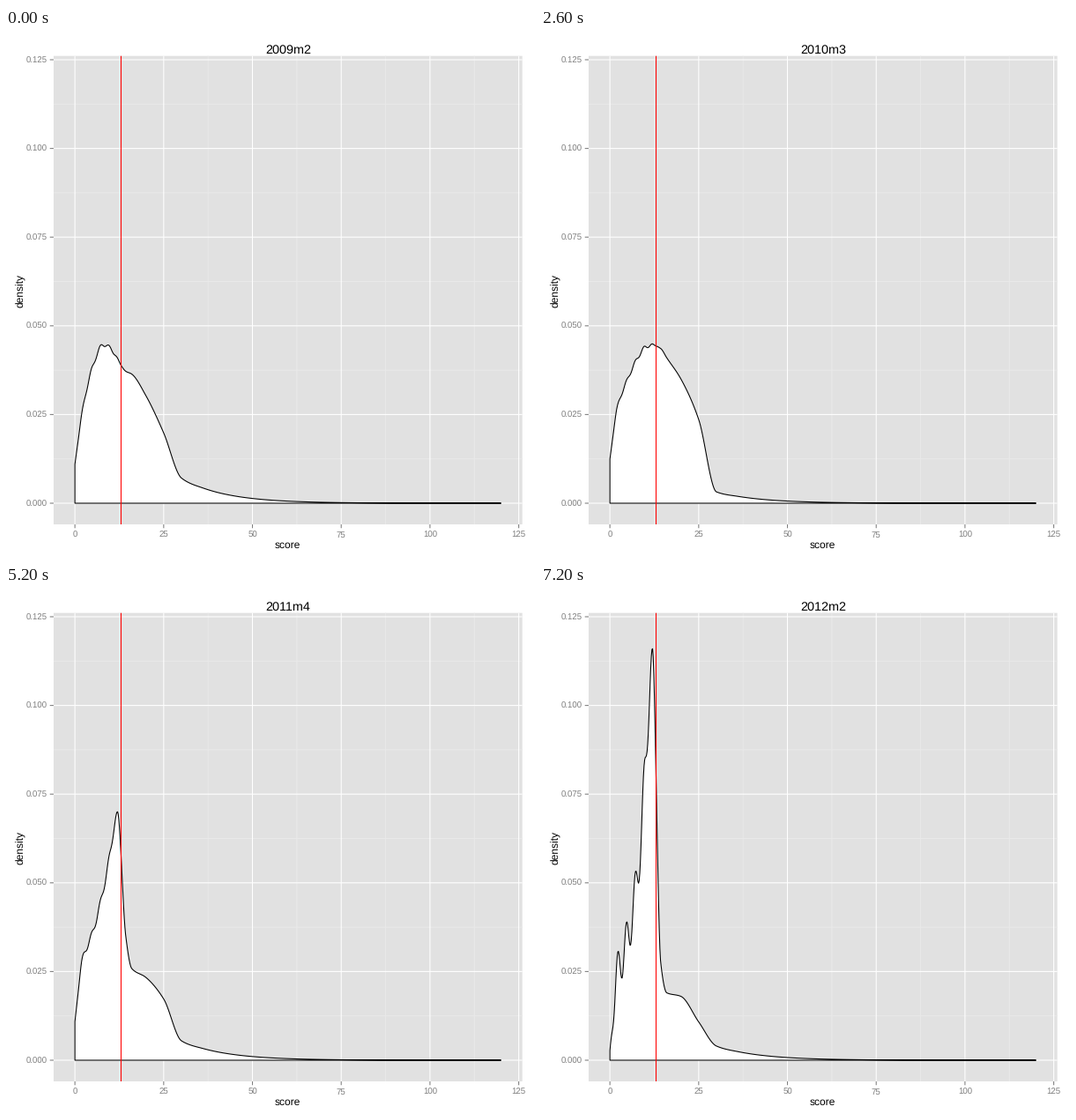
Write a matplotlib script that moves like this. It is 600 px wide and 600 px high and loops after 7400 ms.

```python
import numpy as np
import matplotlib.pyplot as plt
from matplotlib.animation import FuncAnimation
from matplotlib.patches import Polygon, Rectangle

SIZE, DPI = 600, 100
PT = 72 / DPI  # points per pixel
MONTHS, STEP_MS = 37, 200
LEFT, RIGHT, TOP, BOTTOM = 54, 585.6, 31.7, 563
STROKE = 1.07
GREY = "#7F7F7F"

plt.rcParams.update({
    "font.family": "Liberation Sans",
    "text.hinting": "none",
    "path.snap": False,
})


def px(score):
    return 78.16 + 4.0273 * score


def py(density):
    return 539 - 4024 * density


# Density in thousandths at a few scores, keyed by months since 2009m2.
SCORES = [0, 2, 5, 8, 10, 12, 14.3, 16, 20, 25, 30]
HEIGHTS = {
    0: [10.9, 25.4, 38.5, 44.7, 43.7, 40.6, 37.2, 36.4, 30.3, 19.8, 7.1],
    5: [9.7, 25.6, 38.3, 47.1, 49.3, 46, 43, 42, 33.5, 19.6, 2.9],
    13: [12.4, 26.6, 35, 41.3, 44, 44.6, 43.6, 41, 35, 23.6, 3.2],
    17: [15.1, 26.3, 33.5, 39.2, 42.4, 43, 42, 40.8, 35.3, 27.8, 1.7],
    22: [14.2, 32.8, 40.5, 46, 49, 51.2, 36, 31, 26.7, 20, 4.1],
    29: [8.2, 24.1, 32.7, 49.5, 66.2, 83.2, 34.5, 22, 20.8, 15.2, 6.5],
    36: [2, 23.8, 34.3, 54, 83, 112.4, 27.6, 19, 18, 10.8, 4],
}
TAIL = np.arange(36, 121, 6)
GRID = np.linspace(0, 120, 700)


def smooth(x, y, at):
    """Monotone cubic interpolation."""
    x, y = np.asarray(x, float), np.asarray(y, float)
    h = np.diff(x)
    d = np.diff(y) / h
    a, b = d[:-1], d[1:]
    same = a * b > 0
    m = np.concatenate([d[:1], np.zeros(len(a)), d[-1:]])
    m[1:-1][same] = 2 * a[same] * b[same] / (a[same] + b[same])
    i = np.clip(np.searchsorted(x, at, side="right") - 1, 0, len(h) - 1)
    t = (at - x[i]) / h[i]
    return (y[i] * (1 + 2 * t) * (1 - t) ** 2 + m[i] * h[i] * t * (1 - t) ** 2
            + y[i + 1] * t**2 * (3 - 2 * t) - m[i + 1] * h[i] * t**2 * (1 - t))


def ripple(month):
    """Wave below the cutoff that sharpens in the last months."""
    size = 0.5 + 5.5 * (month / 36) ** 8
    window = np.exp(-((GRID - 6.5) / 6) ** 8)
    return size * window * np.cos(2 * np.pi * (GRID - 2.2) / 2.45)


def outline(month):
    """Closed density outline in pixels."""
    body = [np.interp(month, list(HEIGHTS), column)
            for column in zip(*HEIGHTS.values())]
    tail = body[-1] * np.exp((SCORES[-1] - TAIL) / 12)
    density = smooth(np.append(SCORES, TAIL), np.append(body, tail), GRID)
    density = (density + ripple(month)) / 1000
    return np.vstack([(px(0), py(0)),
                      np.column_stack([px(GRID), py(density)]),
                      (px(120), py(0))])


fig = plt.figure(figsize=(SIZE / DPI, SIZE / DPI), dpi=DPI, facecolor="white")
ax = fig.add_axes([0, 0, 1, 1])
ax.set(xlim=(0, SIZE), ylim=(SIZE, 0))
ax.axis("off")


def line(xs, ys, color, z=2):
    ax.plot(xs, ys, color=color, lw=STROKE * PT, zorder=z,
            solid_capstyle="butt")


def label(x, y, text, size, color="black", ha="center", **kw):
    return ax.text(x, y, text, fontsize=size * PT, color=color, ha=ha,
                   va="baseline", **kw)


ax.add_patch(Rectangle((LEFT, TOP), RIGHT - LEFT, BOTTOM - TOP,
                       fc="#E1E1E1", ec="none", zorder=0))

for i in range(5):
    x, y = px(12.5 + 25 * i), py(0.0125 + 0.025 * i)
    line([x, x], [TOP, BOTTOM], "#E9E9E9", 1)
    line([LEFT, RIGHT], [y, y], "#E9E9E9", 1)
for i in range(6):
    x, y = px(25 * i), py(0.025 * i)
    line([x, x], [TOP, BOTTOM], "white")
    line([LEFT, RIGHT], [y, y], "white")
    line([x, x], [BOTTOM, BOTTOM + 4.25], GREY)
    line([LEFT - 4.25, LEFT], [y, y], GREY)
    label(x, 578.3, str(25 * i), 9.6, GREY)
    label(47, y + 3.5, f"{0.025 * i:.3f}", 9.6, GREY, "right")

label(319.8, 590, "score", 12)
label(19.8, 297.5, "density", 12, rotation=90, rotation_mode="anchor")
title = label(319.8, 29, "", 14.4)

shape = Polygon(outline(0), closed=True, fc="white", ec="black",
                lw=STROKE * PT, joinstyle="round", zorder=3)
ax.add_patch(shape)
line([px(13)] * 2, [TOP, BOTTOM], "red", 4)


def draw(month):
    year, m = divmod(month + 1, 12)
    title.set_text(f"{2009 + year}m{m + 1}")
    shape.set_xy(outline(month))
    return title, shape


anim = FuncAnimation(fig, draw, frames=MONTHS, interval=STEP_MS,
                     repeat=True, repeat_delay=0)
plt.show()
```
